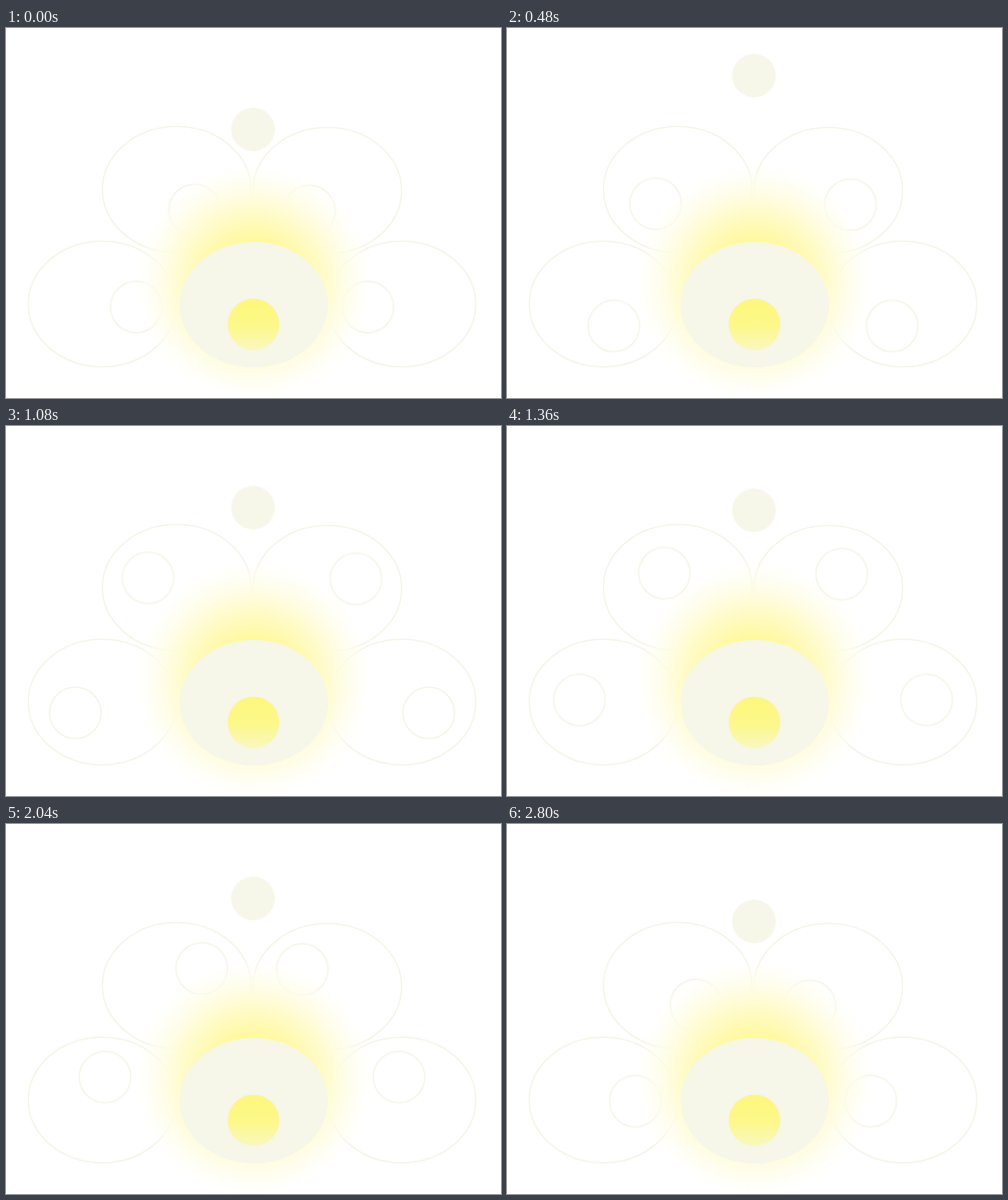
Write an HTML page without scripts that moves like this. It is 500x374 px and loops after 2840 ms.

```html
<!DOCTYPE html>
<html lang="en">
<head>
<meta charset="utf-8">
<title>Glowing petals</title>
<style>
  html, body { margin: 0; width: 100%; height: 100%; overflow: hidden; background: #fff; }
  svg { display: block; width: 500px; height: 374px; }
  .line { fill: none; stroke: #f5f5ea; stroke-width: 1.5; }
  .solid { fill: #f6f6e9; }

  /* 71 ticks of 40 ms; the small negative delay keeps ticks clear of rounding */
  .ball, .high, .low { animation: 2840ms -4ms infinite; }
  .ball { animation-name: bounce; }
  .high { animation-name: orbit-high; }
  .low { animation-name: orbit-low; }

  @keyframes bounce {
    0%       { transform: translate(249.5px, 102.5px); animation-timing-function: steps(15); }
    21.1268% { transform: translate(249.5px, 34.5px); animation-timing-function: steps(12); }
    38.0282% { transform: translate(249.5px, 82.5px); animation-timing-function: steps(13); }
    56.338%  { transform: translate(249.5px, 87.5px); animation-timing-function: steps(10); }
    70.4225% { transform: translate(249.5px, 74px); animation-timing-function: steps(21); }
    100%     { transform: translate(249.5px, 99.7px); }
  }
  @keyframes orbit-high {
    0%       { transform: translate(190.5px, 184px); animation-timing-function: steps(15); }
    21.1268% { transform: translate(140px, 176px); animation-timing-function: steps(12); }
    38.0282% { transform: translate(143.5px, 153.5px); animation-timing-function: steps(13); }
    56.338%  { transform: translate(172px, 144.5px); animation-timing-function: steps(10); }
    70.4225% { transform: translate(198px, 144px); animation-timing-function: steps(21); }
    100%     { transform: translate(190.5px, 185px); }
  }
  @keyframes orbit-low {
    0%       { transform: translate(131.5px, 282px); animation-timing-function: steps(15); }
    21.1268% { transform: translate(102px, 306px); animation-timing-function: steps(12); }
    38.0282% { transform: translate(70px, 290px); animation-timing-function: steps(13); }
    56.338%  { transform: translate(76px, 265.5px); animation-timing-function: steps(10); }
    70.4225% { transform: translate(98.5px, 254.5px); animation-timing-function: steps(21); }
    100%     { transform: translate(131px, 281.5px); }
  }
</style>
</head>
<body>
<svg viewBox="0 0 500 374">
  <defs>
    <radialGradient id="glow" gradientUnits="userSpaceOnUse" cx="250" cy="257" r="120">
      <stop offset=".34" stop-color="#fff99c"/>
      <stop offset=".5" stop-color="#fffab8"/>
      <stop offset=".68" stop-color="#fffcd6" stop-opacity=".95"/>
      <stop offset=".85" stop-color="#fffdea" stop-opacity=".6"/>
      <stop offset="1" stop-color="#fffef4" stop-opacity="0"/>
    </radialGradient>
    <linearGradient id="core" x2="0" y2="1">
      <stop offset="0" stop-color="#fdf878"/>
      <stop offset=".55" stop-color="#fcf88c"/>
      <stop offset="1" stop-color="#f9f7c2"/>
    </linearGradient>
  </defs>

  <g class="line">
    <ellipse cx="172.4" cy="163.3" rx="75" ry="63.7"/>
    <circle class="high" r="26"/>
    <ellipse cx="97.2" cy="279" rx="74.7" ry="63.5"/>
    <circle class="low" r="26"/>
  </g>
  <g class="line" transform="matrix(-1 0 0 1 497 0)">
    <g transform="translate(0 1)">
      <ellipse cx="172.4" cy="163.3" rx="75" ry="63.7"/>
      <circle class="high" r="26"/>
    </g>
    <ellipse cx="97.2" cy="279" rx="74.7" ry="63.5"/>
    <circle class="low" r="26"/>
  </g>

  <circle cx="250" cy="257" r="120" fill="url(#glow)"/>
  <ellipse class="solid" cx="250.3" cy="279.5" rx="74.8" ry="63.5"/>
  <circle cx="250" cy="299.5" r="26" fill="url(#core)"/>
  <circle class="solid ball" r="22"/>
</svg>
</body>
</html>
```
